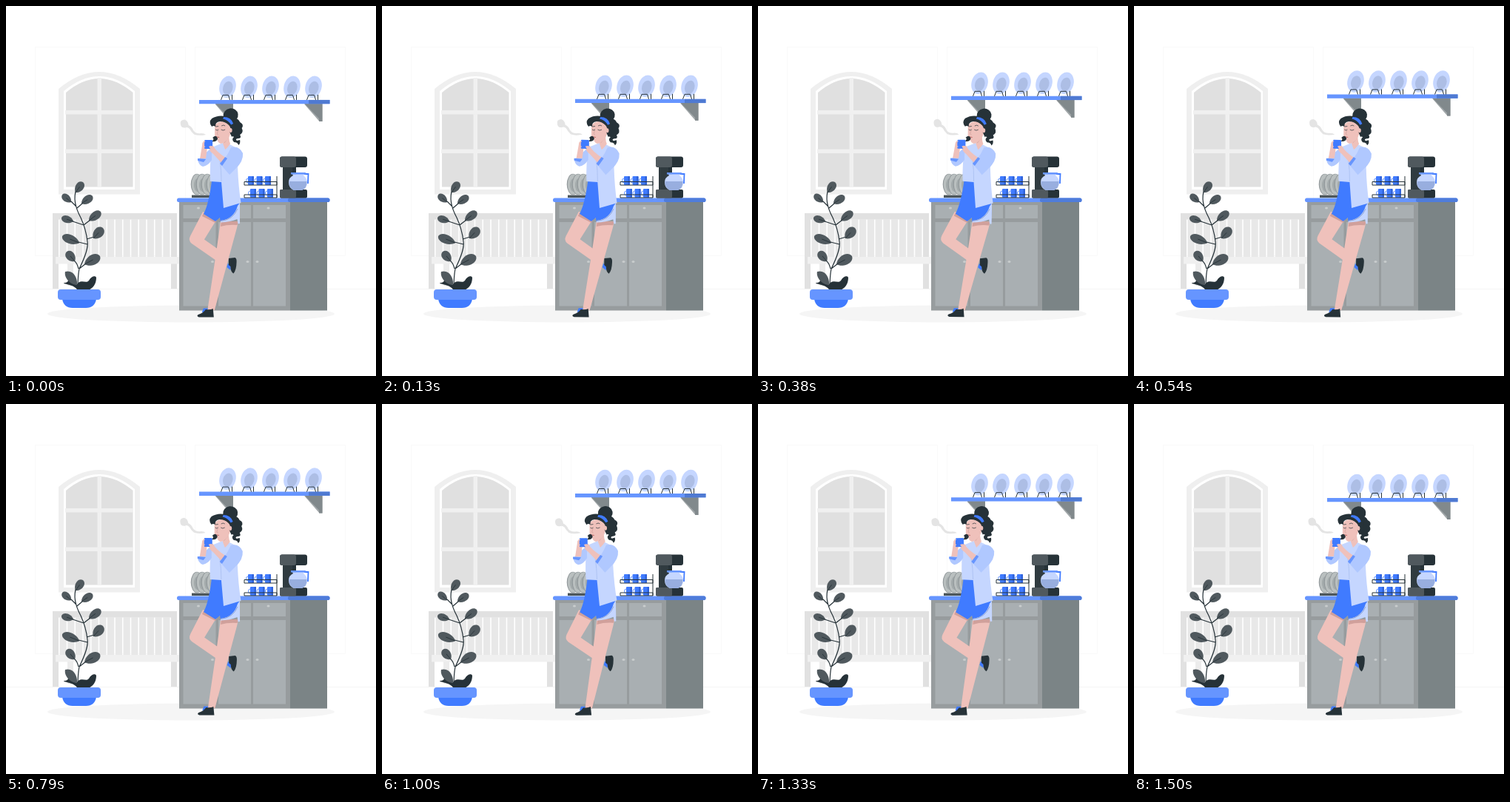
Animation, 500 px wide and 500 px high, one loop 1.54 s. Source, as an HTML page with a canvas:

```html
<!DOCTYPE html>
<html lang="en">
<head>
<meta charset="utf-8">
<title>Coffee break</title>
<style>
  html, body { margin: 0; width: 100%; height: 100%; overflow: hidden; background: #fff; }
  canvas { display: block; width: 500px; height: 500px; }
</style>
</head>
<body>
<canvas id="stage" width="500" height="500"></canvas>
<script>
const ctx = document.getElementById('stage').getContext('2d');
const LOOP = 1540;
const BLUE = '#407bff', MID = '#6695ff', PALE = '#c5d6ff', SLEEVE = '#b0c8ff';
const DARK = '#263238', SLATE = '#50595e', SKIN = '#efc1bb', SKIN_SHADE = '#d0a09b';

const shape = (d, color) => { ctx.fillStyle = color; ctx.fill(new Path2D(d)); };
const line = (d, color, width = 1) => {
  ctx.strokeStyle = color;
  ctx.lineWidth = width;
  ctx.stroke(new Path2D(d));
};
const rect = (x, y, w, h, color, r = 0) => {
  ctx.fillStyle = color;
  ctx.beginPath();
  ctx.roundRect(x, y, w, h, r);
  ctx.fill();
};
const oval = (x, y, rx, ry, color, turn = 0) => {
  ctx.fillStyle = color;
  ctx.beginPath();
  ctx.ellipse(x, y, rx, ry, turn, 0, Math.PI * 2);
  ctx.fill();
};

function drawRoom() {
  rect(0, 0, 500, 500, '#fff');
  line('M39.5 55.5H242.5V337.5H39.5ZM255.5 55.5H458.5V337.5H255.5Z', '#f9f9f9');
  line('M0 382.5H500', '#f4f4f4');
  oval(250, 416, 194, 11.5, '#f5f5f5');
}

function drawWindow() {
  shape('M71 112Q126 66 181 112V254.5H71Z', '#efefef');
  shape('M78 115Q126 75 174 115V248H78Z', '#fff');
  shape('M81 117Q126 79 171.5 117V244.5H81Z', '#e0e0e0');
  rect(123.5, 97, 5.5, 148, '#f0f0f0');
  for (const y of [141, 193.5]) rect(80, y, 92, 5.5, '#f0f0f0');
}

function drawBench() {
  rect(63, 280, 168, 8.5, '#e1e1e1');
  rect(63, 288, 8, 94, '#e1e1e1');
  rect(223, 288, 8, 94, '#e1e1e1');
  for (let x = 72.5; x < 222; x += 10.75) rect(x, 288, 9.2, 52, '#e8e8e8');
  rect(83, 348, 8, 30, '#ececec');
  rect(67, 339, 167, 9.5, '#f0f0f0');
}

// A teardrop from its base to its tip, widest past the middle.
function drawLeaf(baseX, baseY, tipX, tipY, width) {
  const length = Math.hypot(tipX - baseX, tipY - baseY);
  const w = width * .68;
  ctx.save();
  ctx.translate(baseX, baseY);
  ctx.rotate(Math.atan2(tipY - baseY, tipX - baseX));
  shape(`M0 0C${length * .25} ${-w} ${length * .95} ${-w} ${length} 0C${length * .95} ${w} ${length * .25} ${w} 0 0Z`, SLATE);
  line(`M0 0H${length * .55}`, DARK, .8);
  ctx.restore();
}

function drawPlant() {
  shape('M97 384C90 375 79 377 78 374C88 374 84 366 80 360C87 356 95 365 96 376C101 368 108 376 112 371C115 365 121 364 122 367C122 374 119 381 111 384Z', DARK);
  shape('M80 359C90 356 97 366 96 377C87 377 78 367 80 359Z', SLATE);
  line('M97 383Q97 365 99 355Q112 329 110 318Q108 301 101 286Q89 264 95 248M99 355L108 348M98 355Q96 347 92 344M110 322L98 319M109 315L119 312M105 296L90 291M105 296L114 289M95 271L88 264M96 273L103 267', DARK, 1.2);
  drawLeaf(94, 252, 104, 238, 11);
  drawLeaf(88, 265, 76, 255, 9.5);
  drawLeaf(102, 267, 117, 257, 10.5);
  drawLeaf(91, 291, 75, 286, 9.5);
  drawLeaf(112, 290, 128, 278, 11);
  drawLeaf(99, 320, 76, 311, 12);
  drawLeaf(118, 314, 131, 300, 13);
  drawLeaf(93, 345, 82, 332, 11.5);
  drawLeaf(106, 349, 127, 338, 13.5);
  shape('M76 396H122Q120 408 108 408H90Q78 408 76 396Z', BLUE);
  rect(70, 383, 58, 14, MID, 4);
}

function drawCounter() {
  rect(234, 263, 150, 148.5, '#979c9e');
  rect(384, 263, 50, 148.5, '#7b8486');
  for (const x of [239.5, 287, 334]) {
    rect(x, 269, 44, 18, '#a9afb2');
    rect(x, 292, 44, 113.5, '#a9afb2');
  }
  for (const [x, y] of [[260, 273], [354.5, 273], [279, 345.5], [326.5, 345.5], [339.5, 345.5]])
    oval(x, y, 2, 1.5, '#c8cccd');
  rect(231, 259.5, 206.5, 5.5, MID, 2.5);
  rect(381, 259.5, 56.5, 5.5, '#4f7cda', 2.5);
}

function drawDishes() {
  for (let x = 258; x <= 279; x += 7) {
    oval(x, 241, 8.3, 14.3, '#90979a');
    oval(x + .4, 241, 7.6, 13.8, '#b9bfbf');
    oval(x + .5, 242, 4.5, 9, '#a3aaab');
  }
  rect(251, 255.5, 30, 3.5, '#4d575b');
}

function drawMugs() {
  for (const [left, y] of [[327, 230], [330, 247]]) {
    for (let i = 0; i < 3; i++) {
      const x = left + i * 11.5;
      rect(x, y, 8, 12, BLUE, 1);
      rect(x + 5.5, y, 2.5, 12, '#2f62d8', 1);
      line(`M${x} ${y + 3}q-2.5 0 -2.5 3t2.5 3`, MID, 1);
    }
  }
  line('M322 237.5H366V242H322ZM322 255H366V259H322ZM366 230V259', DARK, 1);
}

function drawCoffeeMaker() {
  rect(374, 215, 18, 36, DARK);
  rect(374, 216, 13, 32, '#303b40');
  rect(370, 203.5, 37, 14.5, DARK, 3);
  rect(370, 203.5, 22, 14.5, SLATE, 3);
  rect(370, 248, 37, 11.5, DARK, 2);
  rect(370, 248, 22, 11.5, SLATE, 2);
  line('M400 227H408.5L408 240', BLUE, 1.8);
  shape('M386 226H404L402 229Q407 233 407 238Q407 246 400 249H389Q382 246 382 238Q382 232 388 229Z', '#c5d6ff');
  shape('M382.5 237H406.5Q407 246 400 249H389Q382 245 382.5 237Z', '#98aedf');
  rect(385, 225, 20, 2.5, MID);
}

function drawShelf(lift) {
  ctx.save();
  ctx.translate(0, lift);
  for (const x of [283, 403.5]) {
    shape(`M${x} 132h24v24h-4L${x} 133Z`, '#a1a7a9');
    shape(`M${x} 132h24v24h-4.5v-4Z`, '#81898c');
  }
  rect(261, 127, 176.5, 5.3, MID);
  rect(409, 127, 28.5, 5.3, '#4f7ad2');
  for (let i = 0; i < 5; i++) {
    const x = 299.5 + i * 29;
    oval(x, 109.5, 11, 15, PALE, .27);
    oval(x + .3, 111, 6.6, 9.3, '#adbee5', .27);
    line(`M${x - 9} 127L${x - 6.5} 120.5H${x + 1}L${x + 3} 127M${x + 6} 120V127`, DARK, 1);
  }
  ctx.restore();
}

function drawLegs() {
  shape('M266 278L285 288L268 315.5L290 331V348L251 321Q246 317 249 311Z', SKIN);
  shape('M267 280L285 289L283 293L265 284Z', SKIN_SHADE);
  shape('M300 348L304 350L303.5 357L298.5 353Z', BLUE);
  shape('M301 341L309.5 340Q312 341 311.7 346Q311.5 357 307.5 361.5Q303.5 359 303.5 352L301 350Z', DARK);
  shape('M290 291H314L312 300L282 411H272.5L284 334Z', SKIN);
  shape('M291 291H314L312.500 296Q300 295 290 298Z', SKIN_SHADE);
  shape('M267 408.5H273L271 414H265Z', BLUE);
  shape('M270 410Q276 411 280 409L281 420.5H261Q257 419 260 417Q267 415 270 410Z', DARK);
}

function drawClothes() {
  shape('M278 236H294L315 265Q317 282 314 287Q303 291 290 292L289 286L283 291L267 281Q274 268 278 236Z', BLUE);
  shape('M290 290Q308 288 313 270L316 266V294H313.5L312.5 288Q303 292 290 292.5Z', PALE);
  line('M290 290.5Q307 289 313 274', '#8097cd', .8);
  shape('M293 185L278 191Q275 213 276 237L291 238L294 273L317.500 266Q314 244 313 218L318 199Q312 191 302 187Z', PALE);
  line('M291 237Q291 222 289 208', '#a9bff0', .8);
}

function drawArms() {
  shape('M278 192Q271 196 267 203L259 207Q260 215 266 217Q273 216 278 208Z', SLEEVE);
  shape('M265.500 185Q269 182 272 190L270 206L262 206Z', SKIN);
  shape('M259 206L270 207L267 211L259 209Z', MID);
  shape('M304 191Q315 188 320 199Q321 210 310 220L302 228L289 213Q297 207 304 191Z', SLEEVE);
  shape('M274 190L280 189Q283 196 298 206L293 214L280 200Q274 196 274 190Z', SKIN);
  shape('M289 213L296 204L299 206L292 216Z', MID);
}

function drawHead() {
  shape('M303 152Q313 150 316 157Q322 160 318.500 165Q321.500 171 316 174Q319 179 313 179Q309 180 312 182L316 181Q317 186 314 188Q313 184 308 184Q304 180 308 177Q302 175 303 168Z', DARK);
  shape('M293 174L302 167Q300 180 303 186Q299 192 296 194L293 186Z', SKIN);
  shape('M293 180L301 174L300 179L295 185Z', SKIN_SHADE);
  oval(303.5, 147.5, 10, 9.2, DARK, -.15);
  shape('M282 161Q289 153 302 157Q308 165 303 173Q300 183 291 186Q286 186 285 179L282 176Z', SKIN);
  shape('M278 163Q273 157 278 152Q286 147 296 149Q309 151 311 163Q310 172 305 177L302 170Q305 165 301 161Q296 156 289 156Q282 157 283 163Q280 161 278 163Z', DARK);
  shape('M294 150Q304 150 307 159L304 160.500Q300 154 293 152.500Z', BLUE);
  oval(303.500, 168, 2, 3, SKIN);
  line('M283 167Q285 169 287 167M290.5 167Q293 169 296 167M283 163L287 162.5M291 162Q294 160 296 162', DARK, .7);
  line('M286.5 168L285 173L287 174', SKIN_SHADE, .7);
  shape('M279 178Q284 173 286 179Q285 184 278 183Q282 180 279 178Z', DARK);
  line('M285 177L288 177.5', '#b65a5a', .9);
}

function drawCup() {
  rect(268, 181, 11, 12, BLUE, 1.2);
  line('M269 183Q266 183 266 187T269 190', SKIN, 1.2);
  shape('M274 190Q277 188 280 190L282 194L278 196Z', SKIN);
}

function drawSteam() {
  shape('M236 161Q234 154 241 153.500Q246 155 246.500 161Q251 163 253 168Q256 173 264 172Q268 172 270 174Q260 176 254 173.500Q250 170 248 166Q245 163 242 164.500Q237 165 236 161Z', '#e4e4e4');
}

function drawWoman(angle) {
  ctx.save();
  ctx.translate(288, 272);
  ctx.rotate(angle);
  ctx.translate(-288, -272);
  drawSteam();
  drawLegs();
  drawClothes();
  drawHead();
  drawArms();
  drawCup();
  ctx.restore();
}

function render(now) {
  const t = now % LOOP;
  const wave = 2 * Math.PI / LOOP;
  const lift = -4.3 * (1 + Math.cos((t - 715) * wave));
  const sway = .0165 * Math.sin((t + 20) * wave);
  drawRoom();
  drawWindow();
  drawBench();
  drawPlant();
  drawCounter();
  drawDishes();
  drawMugs();
  drawCoffeeMaker();
  drawShelf(lift);
  drawWoman(sway);
}

const start = performance.now();
function tick() {
  render(performance.now() - start);
  requestAnimationFrame(tick);
}
tick();
</script>
</body>
</html>
```
